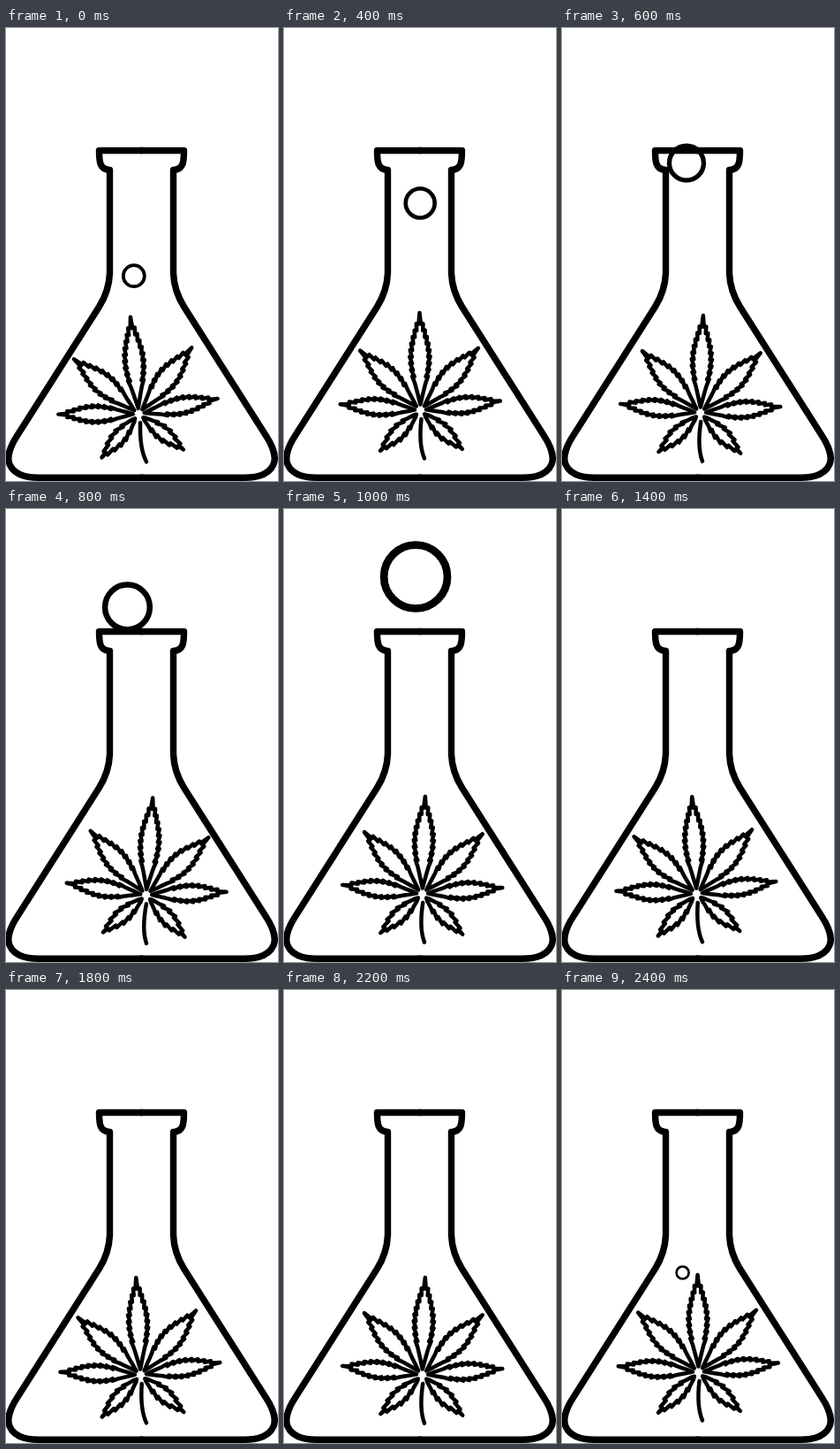
An HTML page that plays this animation: 308 by 512 pixels, repeating every 2.6 s.

```html
<!DOCTYPE html>
<html lang="en">
<head>
<meta charset="utf-8">
<title>Flask</title>
<style>
  html, body { margin: 0; width: 100%; height: 100%; overflow: hidden; background: #fff; }
  svg { display: block; width: 100%; height: 100%; }
</style>
</head>
<body>
<svg viewBox="0 0 308 512" fill="none" stroke="#000" stroke-linecap="round" stroke-linejoin="round">
  <defs>
    <path id="side" d="M153 138.500H201.500C201.500 151 201 160 189.500 160.500V277C190 290 194 303 201.500 315
      L294.500 461C303 474 306 486 303 493C298 505 284 508.200 270 508.200H153"/>
  </defs>
  <g stroke-width="7.4">
    <use href="#side"/>
    <use href="#side" transform="translate(307 0) scale(-1 1)"/>
  </g>
  <g id="leaf" stroke-width="4.5"></g>
  <circle id="bubble"/>
</svg>
<script>
const STEP = 200, STEPS = 13;
const leaf = document.getElementById('leaf');
const bubble = document.getElementById('bubble');

function addPath(d, angle = 0) {
  const p = document.createElementNS('http://www.w3.org/2000/svg', 'path');
  p.setAttribute('d', d);
  p.setAttribute('transform', `rotate(${angle})`);
  leaf.append(p);
}

// A serrated leaflet pointing up from the origin
function leaflet(len, half) {
  const width = t => half * Math.sin(Math.PI * t ** 1.1) ** 1.5;
  const teeth = Math.round(len / 12);
  const edge = [0.15, 0.22, 0.28].map(t => [width(t), -t * len]);
  for (let i = 0; i < teeth; i++) {
    const t = 0.34 + 0.54 * i / (teeth - 1);
    edge.push([width(t) + 1.2, -t * len - 1], [Math.max(0.4, width(t) - 1.4), -t * len - 0.6]);
  }
  const mirror = edge.map(([x, y]) => [-x, y]).reverse();
  return 'M' + [[0, -6.5], ...edge, [0, -len], ...mirror].map(p => p.join(' ')).join('L') + 'Z';
}

// One top leaflet, then mirrored pairs: angle, length, half width
addPath(leaflet(110, 10.5), -0.5);
for (const [angle, len, half] of [[44.2, 96, 11], [84.6, 91, 9], [134, 64.500, 7.3]]) {
  for (const side of [-1, 1]) addPath(leaflet(len, half), side * angle - 1.2);
}
addPath('M1 10C-1 28 0 44 4.5 54.5');

// Swings to and fro, turning early to meet the loop's start
function drawLeaf(step) {
  const swing = Math.min(4 - Math.abs(4 - step % 8), 14 - step) - 2;
  const x = 154.5 + 2.1 * swing;
  const y = 432 + 4.3 * Math.sin(Math.abs(swing) * Math.PI / 4);
  leaf.setAttribute('transform', `translate(${x} ${y}) rotate(${2.2 * swing})`);
}

// Rises, wobbles and swells for eight steps, starting on the last one
function drawBubble(step) {
  const n = (step + 1) % STEPS;
  const r = Math.min(41, 7 + 6.8 * n - 2.1 * n ** 2 + 0.295 * n ** 3);
  bubble.style.display = n < 8 ? '' : 'none';
  bubble.setAttribute('cx', 147.3 - 10.7 * Math.cos(2 * Math.PI * n / 4.7));
  bubble.setAttribute('cy', 319.5 - 40.5 * n + 1.4 * n * Math.sin(Math.PI * n / 3));
  bubble.setAttribute('r', r);
  bubble.setAttribute('stroke-width', 1.2 + 0.21 * r);
}

const start = performance.now();
function tick() {
  const step = Math.floor(Math.max(0, performance.now() - start) / STEP) % STEPS;
  drawLeaf(step);
  drawBubble(step);
  requestAnimationFrame(tick);
}
tick();
</script>
</body>
</html>
```
